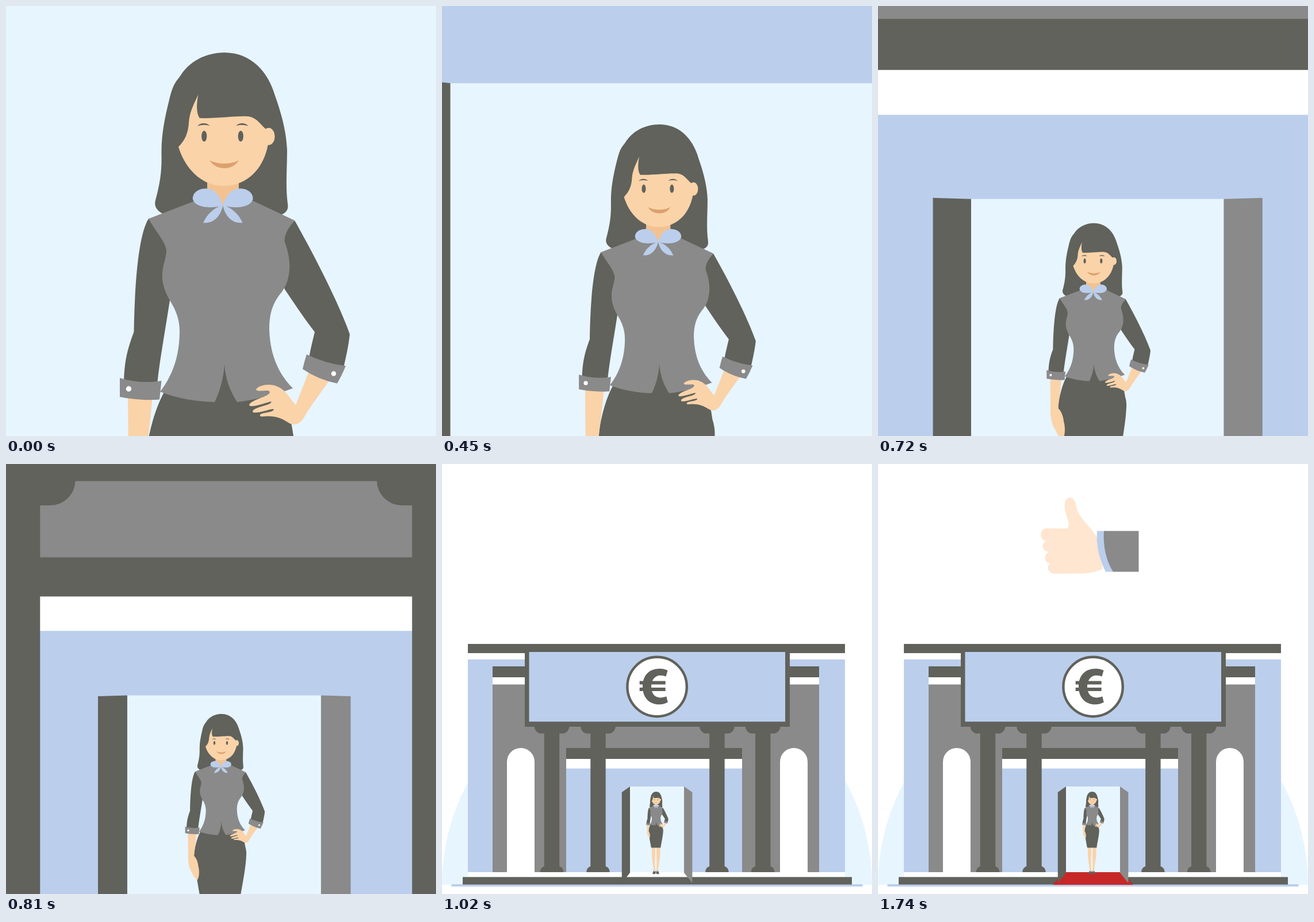
These frames come from a looping animation (748x748 px, 3420 ms). An HTML page:

```html
<!DOCTYPE html>
<html lang="en">
<head>
<meta charset="utf-8">
<title>Bank</title>
<style>
  html, body { margin: 0; width: 100%; height: 100%; overflow: hidden; background: #fff; }
  svg { display: block; width: 100vw; height: 100vh; }
  .dark { fill: #60625b; }
  .gray { fill: #8a8a8a; }
  .blue { fill: #bbceec; }
  .pale { fill: #e7f5ff; }
  .white { fill: #fff; }
  .skin { fill: #fad3a9; }
  .neck { fill: #f3c290; }
  .lips { fill: #dba26e; }
  .palm { fill: #fee6d0; }
  .red { fill: #c62828; }
</style>
</head>
<body>
<svg viewBox="0 0 748 748">
  <defs>
    <g id="column">
      <path d="M-30.3 456.5H30.3A12.2 12.2 0 0 1 18.1 468.8H13.2V700C17 701 20 704 20.3 710H-20.3C-20 704 -17 701 -13.2 700V468.8H-18.1A12.2 12.2 0 0 1 -30.3 456.5Z"/>
    </g>
    <path id="arch" d="M-24 710V518A24 24 0 0 1 24 518V710Z"/>
    <g id="bow">
      <path d="M377 347C372 328 361 317 347 317.500C332 318 324 327 325 336C328 349 352 354 377 347Z"/>
      <path d="M377.500 346C359 352 349 364 343 377C359 379 373 368 377.500 346Z"/>
    </g>
    <path id="brow" d="M-11 2C-6 -4.500 5 -4.500 10.500 1.500C4 -.5 -4 -.5 -11 2Z"/>
  </defs>

  <g id="scene">
    <circle class="pale" cx="374" cy="732" r="374" clip-path="inset(0 0 50% 0)"/>
    <rect class="blue" x="16" y="731" width="716" height="4" rx="2"/>

    <!-- walls and roofs -->
    <rect class="blue" x="45" y="339" width="656" height="371"/>
    <rect class="white" x="45" y="329" width="656" height="11"/>
    <rect class="dark" x="45" y="313" width="656" height="16"/>
    <rect class="gray" x="88" y="383" width="568" height="327"/>
    <rect class="white" x="88" y="371" width="568" height="12.500"/>
    <rect class="dark" x="88" y="352" width="568" height="19"/>
    <use href="#arch" x="137" class="white"/>
    <use href="#arch" x="612" class="white"/>
    <rect class="blue" x="216" y="529" width="306" height="181"/>
    <rect class="white" x="216" y="512" width="306" height="17.700"/>
    <rect class="dark" x="216" y="494" width="306" height="19"/>
    <rect class="white" x="45" y="710" width="656" height="8.500"/>
    <rect class="dark" x="36" y="718.500" width="677" height="13"/>
    <g class="dark" id="columns"></g>

    <!-- sign -->
    <rect class="dark" x="144" y="322" width="461" height="135"/>
    <rect class="blue" x="151.500" y="327" width="445.500" height="121.200"/>
    <circle class="white" cx="374.100" cy="387.500" r="51.700" stroke="#60625b" stroke-width="4.400"/>
    <path class="dark" d="M392.600 359C388 357 384 356 379 356C360 356 349 368 349 387C349 406 360 418.300 378 418.300C384 418.300 388 417 392.800 414.600L390.300 404.300C387 405.800 383 406.400 380 406.400C370 406.400 364 399 364 387C364 375 371 367.700 380 367.700C384 367.700 387 368.500 389.500 369.700Z"/>
    <path class="dark" d="M343.700 377.600H388.700V383.500H343.700ZM343.700 389.100H388.700V395.100H343.700Z"/>

    <!-- doorway -->
    <rect class="pale" x="326.900" y="561" width="94.200" height="149"/>
    <path class="red" id="carpet" d="M322 710H426L444 732H304Z"/>
    <polygon class="dark" id="doorL"/>
    <polygon class="gray" id="doorR"/>

    <!-- clerk, drawn large and scaled down -->
    <g id="clerk">
      <g class="skin">
        <path d="M303 1080H360C371 1190 349 1320 364 1510H334C322 1370 289 1270 303 1080Z"/>
        <path d="M389 1080H449C461 1270 424 1370 413 1510H384C396 1320 374 1190 389 1080Z"/>
      </g>
      <path class="dark" d="M334 1500C345 1530 356 1530 364 1500C374 1530 371 1555 362 1563H318C308 1555 324 1530 334 1500ZM384 1500C392 1530 403 1530 413 1500C422 1530 439 1555 429 1563H386C376 1555 374 1530 384 1500Z"/>
      <path class="dark" d="M380 81C426 81 456 114 468 156C482 195 488 225 489 250C489 285 486 312 490 344C492 356 486 361 474 365H285C268 362 256 352 260 338C269 305 271 285 270.500 258C270 225 276 195 284 163C289 143 292 135 303 122C318 97 347 81 380 81Z"/>
      <path class="neck" d="M350 300H405V328L377 348L350 328Z"/>
      <ellipse class="skin" cx="457" cy="227" rx="10.500" ry="15"/>
      <path class="skin" d="M334.500 154C331 170 331 188 337 195C365 196 400 191 420 192C436 193 443 207 452 214L456 240C448 285 418 313 378 313C342 313 312 285 300 245C312 233 317 220 318 203C319 185 327 170 334.500 154Z"/>
      <g class="dark">
        <ellipse cx="344.700" cy="226.500" rx="4.600" ry="9.500"/>
        <ellipse cx="408.300" cy="226.500" rx="4.600" ry="9.500"/>
        <use href="#brow" x="344" y="207"/>
        <use href="#brow" transform="translate(410.500 207) scale(-1 1)"/>
      </g>
      <path class="lips" d="M354 268C368 276 392 276 405 268C395 287 365 287 354 268Z"/>

      <path class="dark" d="M310 610H450L465 655C490 685 497 725 500 748C505 765 506 775 505 790C502 870 476 980 459 1091H290C262 950 249 860 243 800C241 770 256 705 275 672Z"/>
      <path class="dark" d="M248 370C232 395 224 470 222.500 567C210 600 206 620 205 655L263 660C266 625 276 570 285 512L310 430Z"/>
      <path class="dark" d="M502 373C540 440 580 520 598 571C596 590 592 608 587 630L527 612C530 595 534 580 537 567C520 545 503 520 485 493L460 420Z"/>
      <path class="gray" d="M248 370L326 340L377 347L430 339L502 373C490 387 483 400 485 411C492 430 494 445 493 460C491 480 485 490 480 497C465 515 458 532 458 562C459 600 470 636 499 665C470 676 435 685 402 689C388 667 381 645 380 622C379 645 373 668 363 689C330 688 300 683 268 671C292 640 302 605 302 565C302 540 291 522 285 512C275 495 271 480 272 464C273 450 278 440 279 427C279 412 262 395 248 370Z"/>
      <g class="blue">
        <use href="#bow"/>
        <use href="#bow" transform="translate(754.500) scale(-1 1)"/>
      </g>

      <path class="skin" d="M212 676H255C252 715 246 760 242 794C254 803 262 825 264 845C270 865 270 898 260 914C247 908 239 893 233 880C214 850 211 815 213 790Z"/>
      <path class="gray" d="M198 647Q233 658 270.500 652L267 684.500Q232 687 198 680Z"/>
      <path class="skin" d="M526 638L504 694C495 685 488 668 472 662C460 656 440 659 435 667C436 671 445 669 456 669C463 672 456 677 445 681C435 685 424 689 423 694C424 699 440 694 461 688C464 692 450 695 440 698C432 701 427 704 430 707C440 709 455 702 465 701C469 705 455 707 445 709C440 711 441 715 447 714C465 712 478 716 490 724C500 731 510 728 517 718C530 695 547 674 562 652Z"/>
      <path class="gray" d="M523 606Q555 622 591 626Q584 643 576 656.500Q543 650 516 631.500Q519 618 523 606Z"/>
      <circle class="white" cx="213.500" cy="666" r="4.700"/>
      <circle class="white" cx="570" cy="639.500" r="4.200"/>
    </g>

    <!-- thumbs up -->
    <g id="thumb">
      <path class="palm" d="M334 58.500C342 58.500 344 68 345.500 77C351 96 370 108 381 128L391 182C376 190 358 191 340 190.500L308 191C296 190 292 181 299 173C288 171 288 157 298 153C284 152 283 138 293 134C280 132 280 113 293 112L329 112.500C337 103 325 90 324.500 74C324.500 63 329 58.500 334 58.500Z"/>
      <path class="blue" d="M381 116.500H396L409 187.500H396C385 166 379 141 381 116.500Z"/>
      <path class="gray" d="M393 116.500H453.500V187.500H409C397 169 391 142 393 116.500Z"/>
    </g>
  </g>
</svg>
<script>
  const LOOP = 3420, STEP = 30;
  const CX = 371.9, CY = 622.3, BIG = 10.35;
  const ZOOM = [[240, BIG], [450, 7.96], [630, 5.766], [810, 3.585], [900, 2.51], [1020, 1]];
  const $ = id => document.getElementById(id);
  const scaleBy = s => `translate(${CX} ${CY}) scale(${s}) translate(${-CX} ${-CY})`;

  $('columns').innerHTML = [191, 271.5, 478.4, 558.2]
    .map(x => `<use href="#column" x="${x}"/>`).join('');
  $('clerk').setAttribute('transform', scaleBy(1 / BIG));

  function zoomAt(t) {
    if (t <= ZOOM[0][0]) return BIG;
    for (let i = 1; i < ZOOM.length; i++) {
      const [t0, a] = ZOOM[i - 1], [t1, b] = ZOOM[i];
      if (t <= t1) return a + (b - a) * (t - t0) / (t1 - t0);
    }
    return 1;
  }

  // Outer door edges recede from the stage's middle height.
  function outerY(y, s) {
    const inner = CY + (y - CY) * s;
    const outer = inner + 0.0535 * (inner - 374);
    return CY + (outer - CY) / s;
  }

  function draw(now) {
    const t = Math.floor(now % LOOP / STEP) * STEP;
    const s = zoomAt(t);
    const top = outerY(561, s), low = outerY(711, s);
    const door = (inX, outX) => `${inX},561 ${outX},${top} ${outX},${low} ${inX},711`;
    $('scene').setAttribute('transform', scaleBy(s));
    $('doorL').setAttribute('points', door(327, 312.8));
    $('doorR').setAttribute('points', door(421, 435.4));
    const fade = Math.min(1, Math.max(0, (t - 1200) / 540));
    $('thumb').setAttribute('opacity', fade);
    $('carpet').setAttribute('opacity', fade);
  }

  const start = performance.now();
  function tick() {
    draw(performance.now() - start);
    requestAnimationFrame(tick);
  }
  tick();
</script>
</body>
</html>
```
